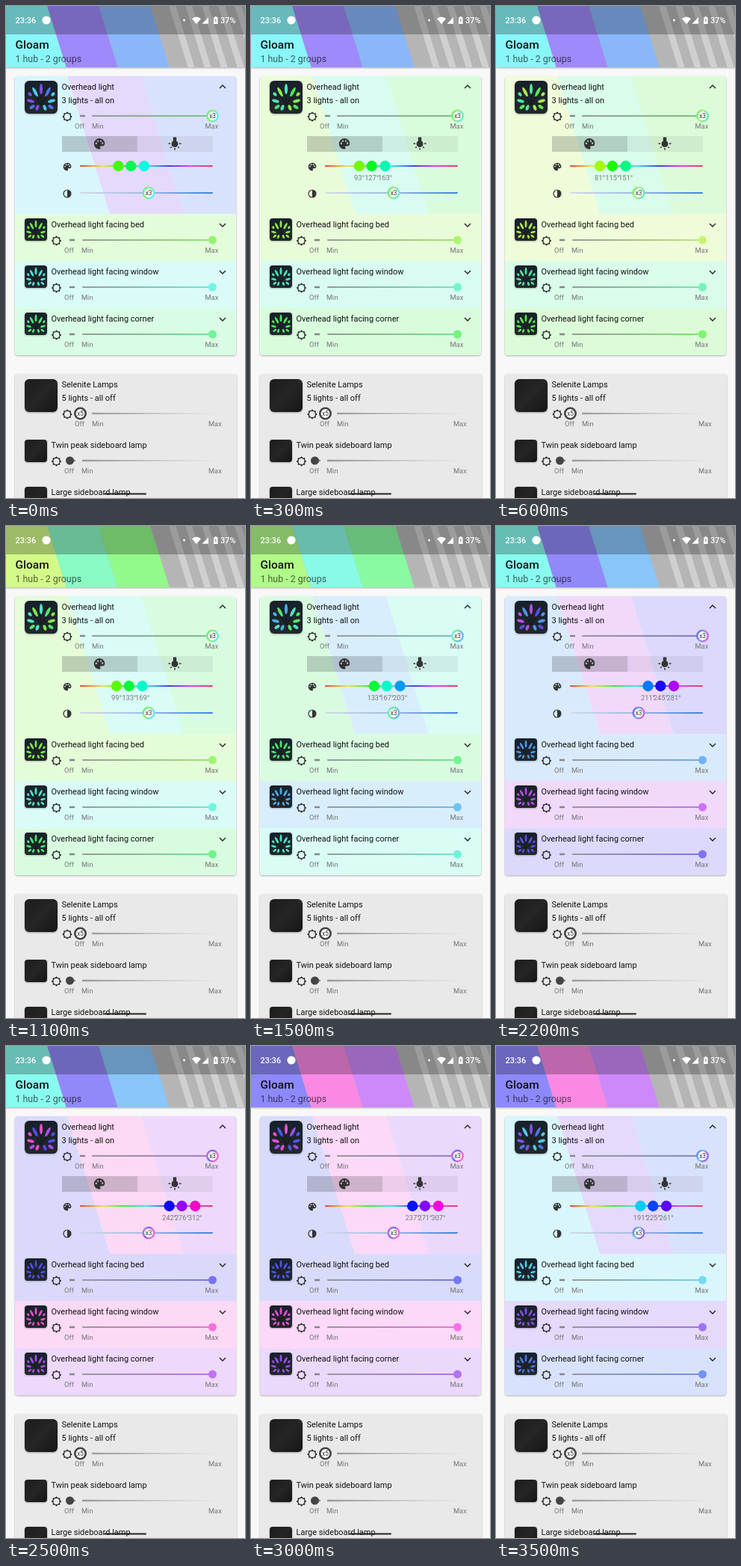
An HTML page for the animation above (3.8 s loop, 320 by 658 pixels).

```html
<!DOCTYPE html>
<html lang="en">
<head>
<meta charset="utf-8">
<title>Light control</title>
<style>
html, body { margin: 0; width: 100%; height: 100%; overflow: hidden; background: #f8f8f8; }
svg { display: block; width: 320px; height: 658px; font-family: Roboto, "Noto Sans", sans-serif; }
.name { font-size: 11px; fill: #111; }
.label { font-size: 9.3px; fill: #777; }
.mid { text-anchor: middle; }
.status { font-size: 10.9px; font-weight: 500; fill: #fff; }
.knob { font-size: 8.2px; fill: #333; text-anchor: middle; }
.tint { fill: hsl(var(--hue) 85% 92%); }
.head { fill: hsl(var(--hue) 92% 76%); }
.hue { fill: hsl(var(--hue) 95% 50%); }
.level { fill: hsl(var(--hue) 85% 70%); }
.leaf { fill: hsl(var(--hue) 75% 60%); }
.track { stroke-width: 2.2; stroke-linecap: round; }
.dash { stroke: #858585; stroke-width: 2.4; }
.icon { fill: #333; }
.chevron { fill: none; stroke: #222; stroke-width: 1.4; }
.soft { filter: drop-shadow(0 1px 1.2px rgba(0,0,0,.3)); }
</style>
</head>
<body>
<script>
const DURATION = 3800, STEP = 100;
// First light's hue while the three handles are dragged together.
const DRAG = [[0, 104], [600, 81], [1100, 99], [1900, 174], [2500, 242], [3000, 237], [3500, 191]];
// The toolbar only refreshes now and then.
const REFRESH = [[0, 182], [900, 81], [1400, 99], [2200, 174], [2800, 242]];
const SPREAD = { a: 0, b: 70, c: 34 };
const SLANT = 0.31;
const hueX = h => 99 + h * 178 / 360;

const text = (x, y, s, cls, extra = '') => `<text x="${x}" y="${y}" class="${cls}" ${extra}>${s}</text>`;
const rect = (x, y, w, h, fill, r = 0, extra = '') =>
  `<rect x="${x}" y="${y}" width="${w}" height="${h}" rx="${r}" fill="${fill}" ${extra}/>`;
const icon = (id, x, y, s = 1) => `<use href="#${id}" transform="translate(${x} ${y}) scale(${s})"/>`;
const hueVar = v => `style="--hue:var(--${v})"`;

function band(x0, x1, y0, y1, attrs) {
  const d = SLANT * (y1 - y0) / 2;
  return `<polygon points="${x0 - d},${y0} ${x1 - d},${y0} ${x1 + d},${y1} ${x0 + d},${y1}" ${attrs}/>`;
}

function ramp(id, stops) {
  return `<linearGradient id="${id}" gradientUnits="userSpaceOnUse" x1="99" x2="277" y1="0" y2="0">` +
    stops.map((c, i) => `<stop offset="${i / (stops.length - 1)}" style="stop-color:${c}"/>`).join('') +
    '</linearGradient>';
}

function ring(id) {
  return `<linearGradient id="${id}" x2="1" y2=".4">` + ['c', 'a', 'b'].map((v, i) =>
    `<stop offset="${.15 + i * .35}" style="stop-color:hsl(var(--${v}) 80% 68%)"/>`).join('') + '</linearGradient>';
}

const track = (x0, x1, y, id) => `<rect x="${x0}" y="${y - 1.1}" width="${x1 - x0}" height="2.2" rx="1" fill="url(#${id})"/>`;
const taper = (x0, x1, y) => `<polygon points="${x0},${y - 1.3} ${x1},${y - .3} ${x1},${y + .3} ${x0},${y + 1.3}" fill="url(#fade)"/>`;
const dash = (x, y) => `<path d="M${x} ${y}h7" class="dash"/>`;

const knob = (x, y, s, stroke) =>
  `<circle cx="${x}" cy="${y}" r="7.2" fill="#fafafa" stroke="${stroke}" stroke-width="2.6"/>` + text(x, y + 2.9, s, 'knob');

const labels = (x, y, min, max) => text(x, y, 'Off', 'label') + text(min, y, 'Min', 'label') + text(max, y, 'Max', 'label');

const LEAVES = [[22, 11, 0, 7], [14, 15, -28, 7], [31, 15, 28, 7], [8, 27, -75, 5], [36, 27, 75, 5],
  [10, 35, 55, 4], [17, 36, 20, 4], [27, 36, -20, 4], [35, 35, -55, 4], [7, 18, -40, 3], [38, 18, 40, 3]];

function thumb(x, y, size, hues) {
  const leaves = hues ? LEAVES.map(([cx, cy, turn, len], i) =>
    `<ellipse class="leaf" ${hueVar(hues[i % hues.length])} cx="${cx}" cy="${cy}" rx="2.1" ry="${len}" transform="rotate(${turn} ${cx} ${cy})"/>`
  ).join('') + '<path d="M22 33V19M21 32L16 21M23 32L29 21" stroke="#111" stroke-width=".7"/>' : '';
  return `<g class="soft" transform="translate(${x} ${y}) scale(${size / 44})">` +
    rect(0, 0, 44, 44, hues ? 'url(#night)' : 'url(#coal)', 6) + leaves + '</g>';
}

const chevron = (x, y, up) => {
  const d = up ? -2 : 2;
  return `<path class="chevron" d="M${x - 4} ${y - d}L${x} ${y + d}L${x + 4} ${y - d}"/>`;
};

function row(y, title, v) {
  return rect(12, y, 296, 63, 'none', 0, `class="tint" ${hueVar(v)}`) +
    thumb(25, y + 6, 30, [v]) + text(60.5, y + 18, title, 'name') + chevron(290, y + 15) +
    icon('sun', 67.5, y + 36) + dash(85, y + 35) + track(102, 276, y + 35, 'level-' + v) +
    `<circle class="level" ${hueVar(v)} cx="276.5" cy="${y + 35}" r="5.5"/>` + labels(78, y + 52, 101, 266.5);
}

function star() {
  const pts = Array.from({ length: 16 }, (_, i) => {
    const r = i % 2 ? 5.1 : 6.8, a = i * Math.PI / 8;
    return `${(r * Math.cos(a)).toFixed(2)} ${(r * Math.sin(a)).toFixed(2)}`;
  });
  return 'M' + pts.join('L') + 'Z';
}
const hole = (x, y, r) => `M${x - r} ${y}a${r} ${r} 0 1 0 ${2 * r} 0a${r} ${r} 0 1 0 ${-2 * r} 0Z`;

const defs = `<defs>
  <path id="sun" class="icon" fill-rule="evenodd" d="${star()}${hole(0, 0, 3.9)}"/>
  <path id="palette" class="icon" fill-rule="evenodd" d="M0 -7.2A7.2 7.2 0 1 0 0 7.2C1.6 7.2 1.8 5.8 1.2 4.9C.6 3.9 1.2 3 2.4 3H4C6 3 7.3 1.7 7.3 -.3C7.3 -4.2 4 -7.2 0 -7.2Z${hole(-4.2, -.6, 1.2)}${hole(-2, -3.7, 1.2)}${hole(2, -3.7, 1.2)}${hole(4.2, -.8, 1.2)}"/>
  <g id="bulb" class="icon"><path d="M-2.2 -8.5H2.2V-3.6A4.5 4.5 0 1 1 -2.2 -3.6Z"/>
    <path d="M-8.5 0H-6M6 0H8.5M0 6V8.5M-5.8 5.8L-4.2 4.2M5.8 5.8L4.2 4.2" stroke="#333" stroke-width="1.5"/></g>
  <g id="contrast"><circle r="5" fill="none" stroke="#333" stroke-width="1.2"/><path class="icon" d="M0 -4.8A4.8 4.8 0 0 1 0 4.8Z"/></g>
  <linearGradient id="night" x2="0" y2="1"><stop stop-color="#17212b"/><stop offset="1" stop-color="#22272b"/></linearGradient>
  <linearGradient id="coal" x2="1" y2="1"><stop stop-color="#1c1c1c"/><stop offset=".5" stop-color="#252525"/><stop offset="1" stop-color="#161616"/></linearGradient>
  <clipPath id="card">${rect(12, 94, 296, 373, '#000', 4)}</clipPath>
  <clipPath id="bar">${rect(0, 0, 320, 82, '#000')}</clipPath>
  ${ramp('rainbow', [0, 60, 120, 180, 240, 300, 350].map(h => `hsl(${h} 78% 58%)`))}
  ${ramp('sat', ['#d3d9e6', '#9db9e4', '#3f80e4'])}
  ${ramp('master', ['#999', 'hsl(var(--c) 38% 62%)'])}
  ${ramp('fade', ['#999', '#bbb', '#dedede'])}
  ${['a', 'b', 'c'].map(v => ramp('level-' + v, ['#999', `hsl(var(--${v}) 70% 68%)`])).join('')}
  ${ring('trio')}
</defs>`;

const toolbar = `<g class="soft">${rect(0, 0, 320, 82, '#b5b5b5')}</g><g clip-path="url(#bar)">` +
  band(-40, 68, 0, 82, `class="head" ${hueVar('ha')}`) +
  band(68, 137, 0, 82, `class="head" ${hueVar('hb')}`) +
  band(137, 206, 0, 82, `class="head" ${hueVar('hc')}`) +
  [231, 253, 275, 297, 319].map(x => band(x, x + 9, 0, 82, 'fill="#d0d0d0"')).join('') +
  rect(0, 0, 320, 38, 'rgba(0,0,0,.25)') + '</g>' +
  text(12.5, 23, '23:36', 'status') + text(287, 23, '37%', 'status') +
  `<g fill="#fff"><circle cx="54" cy="19" r="5.6"/><circle cx="238.5" cy="19" r="1.4"/>
  <path d="M255 24.2L249 17Q255 11.8 261 17ZM262.5 23.8H271V15ZM278 15.2H279.6V14H282V15.2H283.6V24H278Z"/></g>
  <path d="M280.8 17v4" stroke="#999" stroke-width="1.2"/>` +
  text(12.5, 57, 'Gloam', '', 'font-size="15.5" font-weight="500" fill="#111"') +
  text(12.5, 75, '1 hub - 2 groups', '', 'font-size="12.4" fill="rgba(0,0,0,.62)"');

const litCard = `<g class="soft">${rect(12, 94, 296, 373, '#eee', 4)}</g><g clip-path="url(#card)">` +
  band(-40, 110.7, 94, 278, `class="tint" ${hueVar('ca')}`) +
  band(110.7, 209.3, 94, 278, `class="tint" ${hueVar('cb')}`) +
  band(209.3, 360, 94, 278, `class="tint" ${hueVar('cc')}`) +
  row(278, 'Overhead light facing bed', 'a') +
  row(341, 'Overhead light facing window', 'b') +
  row(404, 'Overhead light facing corner', 'c') + '</g>' +
  thumb(25, 100, 44, ['cb', 'ca', 'cc']) +
  text(74.5, 112, 'Overhead light', 'name') + text(74.5, 130, '3 lights - all on', 'name') + chevron(290, 108, true) +
  icon('sun', 82, 148) + dash(99, 147) + track(115, 276, 147, 'master') + knob(276.5, 147, 'x3', 'url(#trio)') +
  labels(92, 164, 115, 266.5) +
  rect(75, 174, 101, 21, 'rgba(0,0,0,.18)') + rect(176, 174, 101, 21, 'rgba(0,0,0,.06)') +
  icon('palette', 125, 184.3) + icon('bulb', 226, 184) +
  icon('palette', 82, 215, .74) + track(99, 277, 214, 'rainbow') +
  ['a', 'c', 'b'].map(v => `<g id="handle-${v}"><circle class="hue" ${hueVar(v)} cy="214" r="7.2"/>` +
    text(0, 233, '', 'label mid') + '</g>').join('') +
  icon('contrast', 82, 251) + track(99, 277, 250, 'sat') + knob(191, 250, 'x3', 'url(#trio)');

const darkCard = `<g class="soft">${rect(12, 492, 297, 180, '#e9e9e9', 4)}</g>` +
  thumb(25, 499, 44) + text(74.5, 510, 'Selenite Lamps', 'name') + text(74.5, 528, '5 lights - all off', 'name') +
  icon('sun', 82, 546) + taper(115, 283, 545) + knob(99.5, 545, 'x5', '#444') + labels(92, 562, 115, 271) +
  thumb(25, 580, 30) + text(60.5, 591, 'Twin peak sideboard lamp', 'name') +
  icon('sun', 67.5, 609) + dash(86, 608) + taper(102, 283, 608) +
  '<circle cx="85.5" cy="608" r="5.5" fill="#444"/>' + labels(78, 625, 101, 271) +
  thumb(25, 643, 30) + text(60.5, 654, 'Large sideboard lamp', 'name') +
  rect(131, 651.5, 57, 2, '#222', 1);

document.body.innerHTML = `<svg viewBox="0 0 320 658">${defs}${rect(0, 0, 320, 658, '#f8f8f8')}${litCard}${darkCard}${toolbar}</svg>`;
const svg = document.querySelector('svg');
const handles = Object.keys(SPREAD).map(v => [v, document.getElementById('handle-' + v)]);

// Smooth curve through the points, flat at both ends.
function curve(points, t) {
  const last = points.length - 1;
  if (t >= points[last][0]) return points[last][1];
  const i = points.findIndex((p, k) => t < points[k + 1][0]);
  const slope = k => k === 0 || k === last ? 0 :
    (points[k + 1][1] - points[k - 1][1]) / (points[k + 1][0] - points[k - 1][0]);
  const [t0, v0] = points[i], [t1, v1] = points[i + 1];
  const d = t1 - t0, u = (t - t0) / d, w = 1 - u;
  return v0 * (1 + 2 * u) * w * w + slope(i) * d * u * w * w + v1 * u * u * (3 - 2 * u) - slope(i + 1) * d * u * u * w;
}

function render(t) {
  const hue = curve(DRAG, t);
  const card = t < STEP ? 191 : hue;
  const head = REFRESH.filter(p => p[0] <= t).pop()[1];
  for (const [v, handle] of handles) {
    const h = hue + SPREAD[v];
    svg.style.setProperty('--' + v, h);
    svg.style.setProperty('--c' + v, card + SPREAD[v]);
    svg.style.setProperty('--h' + v, head + SPREAD[v]);
    handle.setAttribute('transform', `translate(${hueX(h)} 0)`);
    handle.lastChild.textContent = t < STEP ? '' : Math.round(h) + '°';
  }
}

const start = performance.now();
function tick() {
  const t = (performance.now() - start) % DURATION;
  render(Math.floor(t / STEP) * STEP);
  requestAnimationFrame(tick);
}
render(0);
requestAnimationFrame(tick);
</script>
</body>
</html>
```
